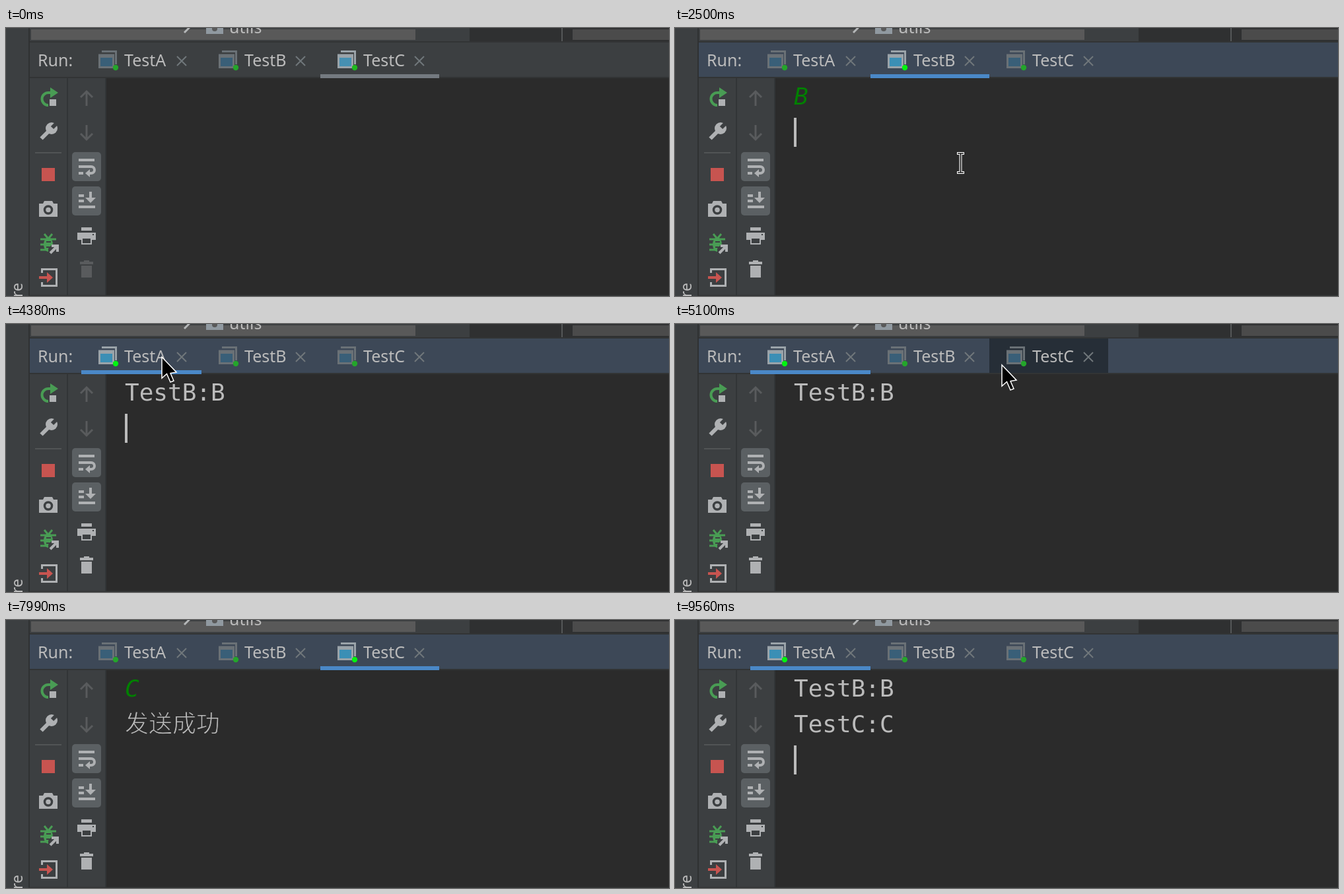
Recreate the animation shown at these times as an HTML page. Size 1004x406 px, loop 9.78 s.

```html
<!DOCTYPE html>
<html lang="en">
<head>
<meta charset="utf-8">
<title>Run console</title>
<style>
  html, body { margin: 0; width: 100%; height: 100%; overflow: hidden; background: #3c3f41; }
  svg { display: block; width: 1004px; height: 406px; }
  text { font: 25px "Noto Sans", "Open Sans", sans-serif; fill: #bbb; white-space: pre; }
  .console text { font: 36px "DejaVu Sans Mono", "Noto Sans CJK SC", monospace; }
  .console .input { font-style: italic; fill: #007f00; }
  /* The background-coloured stroke thins the strokes of the characters. */
  .console .cjk { font: 300 36px "Noto Sans CJK SC", sans-serif; stroke: #2b2b2b; stroke-width: 1; }
  .line { fill: none; stroke: #afb1b3; stroke-width: 4; }
  .thin { stroke-width: 3; }
  .off { stroke: #595b5d; }
  .tab { --frame: #6a7176; --screen: #395f78; --dot: #24a52b; }
  .tab.selected { --frame: #9aa3a9; --screen: #4690b2; --dot: #1fb91f; }
  .focused .tab.selected { --screen: #3b8fb5; --dot: #00f410; }
  .close { stroke: #70777b; stroke-width: 2; }
</style>
</head>
<body>
<svg id="stage" viewBox="0 0 1004 406">
  <rect width="1004" height="406" fill="#3c3f41"/>

  <!-- strip above the tool window -->
  <rect x="702" width="302" height="20" fill="#2f3031"/>
  <rect x="841" width="2" height="20" fill="#555758"/>
  <rect x="38" y="2" width="582" height="16" fill="#595959"/>
  <rect x="858" y="2" width="146" height="16" fill="#4b4b4b"/>
  <path d="M270 7L278 -1" stroke="#b5b7b8" stroke-width="3"/>
  <path d="M303 -10H329V9H303Z" fill="#9099a0"/>
  <circle cx="316" cy="1" r="4" fill="#595959"/>
  <text x="338" y="8">utils</text>
  <rect x="36" y="20" width="968" height="2" fill="#323435"/>

  <!-- side stripe -->
  <rect x="34" width="2" height="406" fill="#2f3132"/>
  <text transform="translate(25 386) rotate(-90)" text-anchor="end" style="font-size:23px">Structure</text>

  <!-- header -->
  <rect id="header" x="36" y="22" width="968" height="52"/>
  <rect x="36" y="74" width="968" height="2" fill="#323435"/>
  <text x="48" y="58">Run:</text>
  <g id="tabs"></g>
  <rect id="underline" y="70" height="6"/>

  <!-- toolbars -->
  <path d="M93 76V406M151 76V406" stroke="#323537" stroke-width="2"/>
  <g fill="#afb1b3">
    <path d="M64 117A9.5 9.5 0 0 1 64 98H69" class="line" style="stroke:#499c54"/>
    <path d="M67 90L79 98L67 106Z" fill="#499c54"/>
    <rect x="66" y="108" width="10" height="10"/>

    <path d="M53.5 167.500L67 154" stroke="#afb1b3" stroke-width="6"/>
    <circle cx="69" cy="152" r="9"/>
    <path d="M70 151L77 144" stroke="#3c3f41" stroke-width="6"/>

    <rect x="44" y="188" width="40" height="2" fill="#515455"/>
    <rect x="54" y="212" width="20" height="20" fill="#c75450"/>

    <path d="M50 266H56L58 262H70L72 266H78V286H50Z"/>
    <circle cx="64" cy="275.5" r="5.5" fill="none" stroke="#3c3f41" stroke-width="3.500"/>

    <ellipse cx="64" cy="328" rx="7" ry="11" fill="#499c54"/>
    <path d="M52 320H76M52 328H76M52 336H76M58 312L63 318M70 312L65 318" stroke="#499c54" stroke-width="3"/>
    <path d="M61 324H68M61 332H68" stroke="#3c3f41" stroke-width="2"/>
    <path d="M64 344V334L72 326H82V344Z" fill="#3c3f41"/>
    <path d="M69 330H78V339M78 330L67 341" class="line"/>

    <path d="M54.5 371V365.500H76.500V390.500H54.500V385" class="line thin"/>
    <path d="M50 376H62V370L71 378L62 386V380H50Z" fill="#c75450"/>

    <path d="M122 118V97M113 105L122 96L131 105M122 147V168M113 160L122 169L131 160" class="line thin off"/>

    <g fill="#5b6063">
      <rect x="100" y="188" width="44" height="44" rx="5"/>
      <rect x="100" y="240" width="44" height="44" rx="5"/>
    </g>
    <path d="M110 200H134M110 210H129A5 5 0 0 1 129 220H125M110 220H117" class="line"/>
    <path d="M127 214V226L120 220Z"/>
    <path d="M110 254H118M110 262H118M110 271H135M128 248V258" class="line"/>
    <path d="M120 257H136L128 265Z"/>

    <path d="M114 302H130V307H114ZM108 310H136V321H108Z"/>
    <path d="M115 318H129V327H115Z" fill="#3c3f41" stroke="#afb1b3" stroke-width="2"/>
    <rect x="131" y="312" width="2" height="2" fill="#3c3f41"/>

    <path id="trash" d="M112 354H118V352H126V354H132V358H112ZM114 360H130V378H114Z"/>
  </g>

  <!-- console -->
  <rect x="152" y="76" width="852" height="330" fill="#2b2b2b"/>
  <g class="console">
    <text id="line0" x="180" y="116"></text>
    <text id="line1" x="180" y="170"></text>
    <rect id="caret" width="4" height="44" fill="#bbb"/>
  </g>
  <rect x="36" y="404.500" width="968" height="1.500" fill="#323435"/>

  <path id="arrow" d="M0 0V32L7.500 25.500L13 38L18 36L13 24.500L22 23Z" fill="#000" stroke="#fff" stroke-width="1.500"/>
  <g id="beam" fill="none">
    <path d="M-5 -14H6M-5 15H6M.5 -14V15" stroke="#fff" stroke-width="4"/>
    <path d="M-4 -14H5M-4 15H5M.5 -14V15" stroke="#111" stroke-width="1.700"/>
  </g>
</svg>
<script>
const LOOP = 9780, CARET_ON = 550, CARET_OFF = 480;
const SENT = '发送成功';
const $ = id => document.getElementById(id);
const set = (el, attrs) => { for (const k in attrs) el.setAttribute(k, attrs[k]); };
const show = (el, on) => set(el, { visibility: on ? 'visible' : 'hidden' });
const tabLeft = i => i ? 116 + 180 * i : 114;
const tabWidth = i => tabLeft(i + 1) - tabLeft(i);

$('tabs').innerHTML = ['TestA', 'TestB', 'TestC'].map((name, i) => `<g class="tab">
  <rect class="hover" x="${tabLeft(i)}" y="22" width="${tabWidth(i)}" height="52"/>
  <g transform="translate(${tabLeft(i) + 26} 34)">
    <path d="M5 1.500H26.500V21" fill="none" stroke="var(--frame)" stroke-width="3"/>
    <path d="M0 5.500H24V27H0Z" fill="var(--frame)"/>
    <path d="M3 11H21V24H3Z" fill="var(--screen)"/>
    <circle cx="26" cy="26" r="4.200" fill="var(--dot)"/>
  </g>
  <text x="${tabLeft(i) + 65}" y="58">${name}</text>
  <path class="close" d="M${tabLeft(i + 1) - 37} 43l14 14m0 -14l-14 14"/>
</g>`).join('');
const tabs = [...document.querySelectorAll('.tab')];

// [time, selected tab, console text]
const scenes = [
  [0, 2, ''],
  [920, 1, ''],
  [1870, 1, 'B'],
  [2500, 1, 'B\n'],
  [2970, 1, `B\n${SENT}\n`],
  [4220, 0, 'TestB:B\n'],
  [5500, 2, ''],
  [6500, 2, 'C'],
  [7200, 2, 'C\n'],
  [7440, 2, `C\n${SENT}\n`],
  [8530, 0, 'TestB:B\nTestC:C\n'],
];

const easeOut = p => 1 - (1 - p) ** 3;
const easeInOut = p => p * p * (3 - 2 * p);

// Pointer moves: [start, end, target x, target y, easing]
const moves = [
  [0, 0, 1020, 540, easeOut],
  [50, 770, 388, 52, easeOut],
  [920, 1240, 423, 206, easeOut],
  [2420, 2500, 432, 204, easeOut],
  [2970, 3030, 461, 202, easeOut],
  [3430, 4060, 215, 49, easeInOut],
  [4220, 5180, 501, 62, easeInOut],
  [5260, 5340, 532, 51, easeOut],
  [5500, 5800, 499, 190, easeInOut],
  [7830, 7990, 385, -45, easeInOut],
  [8060, 8300, 215, 49, easeInOut],
  [8530, 9470, 964, 396, easeInOut],
  [9560, 9560, 1020, 540, easeOut],
];

function pointerAt(time) {
  const i = moves.filter(m => m[0] <= time).length - 1;
  const [start, end, x, y, ease] = moves[i];
  if (time >= end) return [x, y];
  // The pointer is redrawn about every 80 ms.
  const steps = Math.round((end - start) / 80);
  const p = ease(Math.floor((time - start) / (end - start) * steps + .15) / steps);
  const [, , fromX, fromY] = moves[i - 1];
  return [Math.round(fromX + (x - fromX) * p), Math.round(fromY + (y - fromY) * p)];
}

function draw(time) {
  const [since, tab, text] = scenes.filter(s => s[0] <= time).pop();
  const focused = since > 0;
  const [x, y] = pointerAt(time), onHeader = y < 76, onTabs = y >= 22 && y < 72;

  $('stage').classList.toggle('focused', focused);
  set($('header'), { fill: focused ? '#3d4857' : '#3c3f41' });
  set($('underline'), { x: tabLeft(tab), width: tabWidth(tab), fill: focused ? '#4a88c7' : '#747a80' });
  tabs.forEach((el, i) => {
    const hover = el.querySelector('.hover');
    el.classList.toggle('selected', i === tab);
    set(hover, { fill: focused ? '#262e37' : '#27292a' });
    show(hover, onTabs && i !== tab && x >= tabLeft(i) && x < tabLeft(i + 1));
  });

  const lines = text.split('\n'), row = lines.length - 1;
  for (const i of [0, 1]) {
    const line = lines[i] || '';
    $('line' + i).textContent = line;
    set($('line' + i), { class: line === SENT ? 'cjk' : line.length === 1 ? 'input' : '' });
  }
  set($('trash'), { fill: row ? '#afb1b3' : '#595b5d' });

  // The caret restarts its blink at every change and stays lit in an empty console.
  const lit = !text || (time - since) % (CARET_ON + CARET_OFF) < CARET_ON;
  show($('caret'), focused && lit);
  set($('caret'), { x: 180 + lines[row].length * 21, y: 82 + row * 54 });

  for (const id of ['arrow', 'beam']) {
    set($(id), { transform: `translate(${x} ${y})` });
    show($(id), onHeader === (id === 'arrow'));
  }
}

const began = performance.now();
function tick() {
  draw((performance.now() - began) % LOOP);
  requestAnimationFrame(tick);
}
tick();
</script>
</body>
</html>
```
